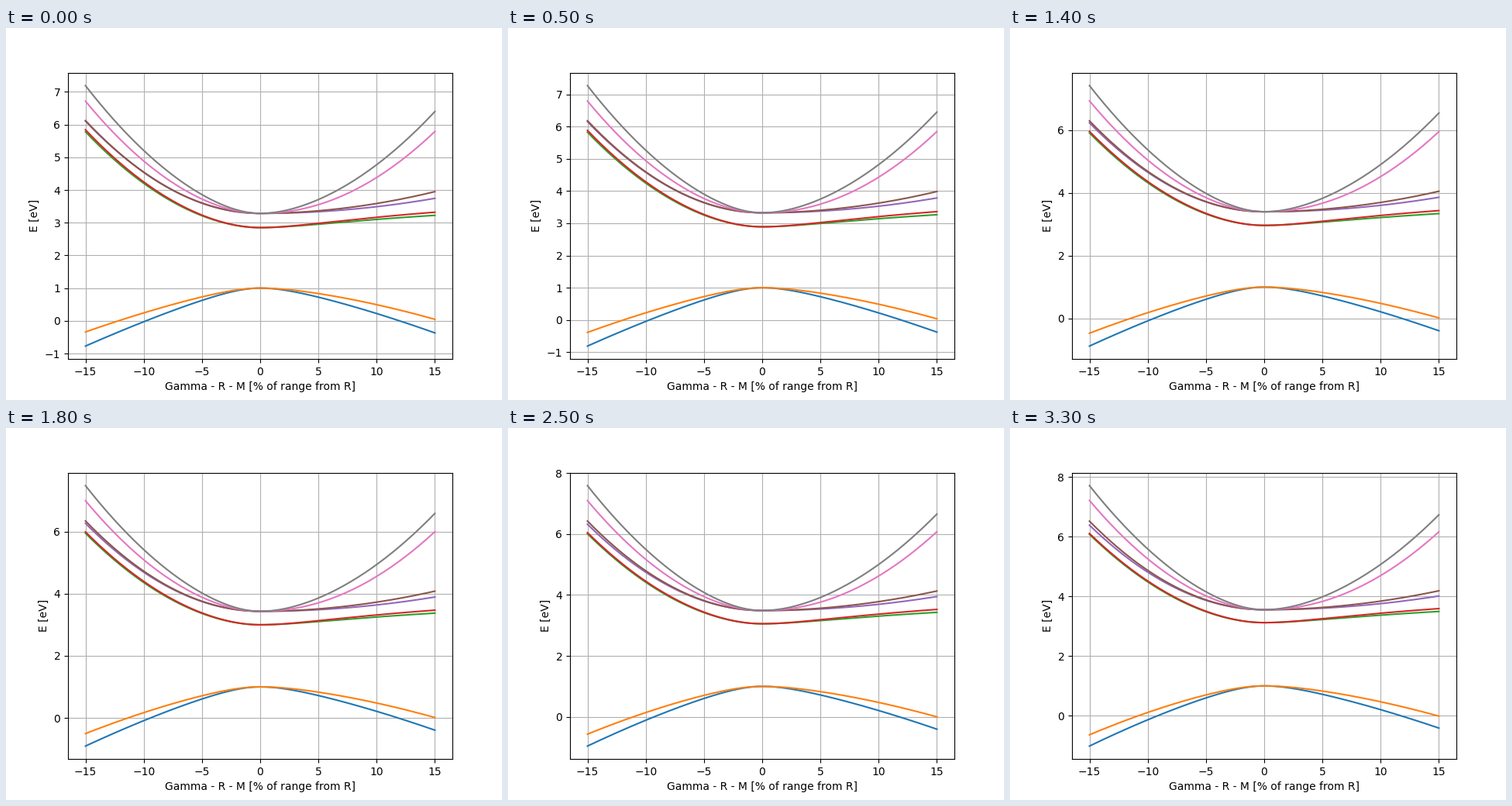
These frames come from a looping animation (640x480 px, 3.4 s). A matplotlib script:

```python
import numpy as np
import matplotlib.pyplot as plt
from matplotlib.animation import FuncAnimation

FRAMES = 34
STEP_MS = 100
SPAN = 15
WIDTH = 0.2

u = np.linspace(0, 1, 101)
hyperbola = np.sqrt(WIDTH**2 + u**2) - WIDTH
hyperbola /= hyperbola[-1]
x = SPAN * np.concatenate([-u[:0:-1], u])


def edge(start, drift=0):
    """Band edge energy at R, moving evenly over the sweep."""
    return lambda t: start + drift * t


def branch(bend, bow, grow=0):
    """Dispersion away from R: a hyperbola plus a growing parabola."""
    return lambda t: bend * hyperbola + (bow + grow * t) * u**2


valence = edge(1)
lower = edge(2.85, 0.272)
upper = edge(3.285, 0.27)

# Edge, branch towards Gamma, branch towards M.
BANDS = [
    (valence, branch(-1.5, -0.272, -0.246), branch(-1.05, -0.32, -0.045)),
    (valence, branch(-1.01, -0.33, -0.3), branch(-0.51, -0.445, -0.06)),
    (lower, branch(0.32, 2.61, 0.03), branch(0.525, -0.15)),
    (lower, branch(0.42, 2.57), branch(0.67, -0.2)),
    (upper, branch(0, 2.825, 0.01), branch(0, 0.46)),
    (upper, branch(0, 2.835, 0.135), branch(0.04, 0.625, -0.03)),
    (upper, branch(0.48, 2.95, 0.235), branch(-0.1, 2.605, 0.11)),
    (upper, branch(1.17, 2.735, 0.256), branch(0.65, 2.465, 0.07)),
]


def energy(band, t):
    base, left, right = (part(t) for part in band)
    return base + np.concatenate([left[:0:-1], right])


fig, ax = plt.subplots(figsize=(6.4, 4.8), dpi=100)
lines = [ax.plot(x, energy(band, 0))[0] for band in BANDS]
ax.set_xlabel("Gamma - R - M [% of range from R]")
ax.set_ylabel("E [eV]")
ax.grid(True)


def update(i):
    t = i / (FRAMES - 1)
    for line, band in zip(lines, BANDS):
        line.set_ydata(energy(band, t))
    ax.relim()
    ax.autoscale_view()
    return lines


anim = FuncAnimation(fig, update, frames=FRAMES, interval=STEP_MS,
                     repeat=True, repeat_delay=0, blit=False)
plt.show()
```
